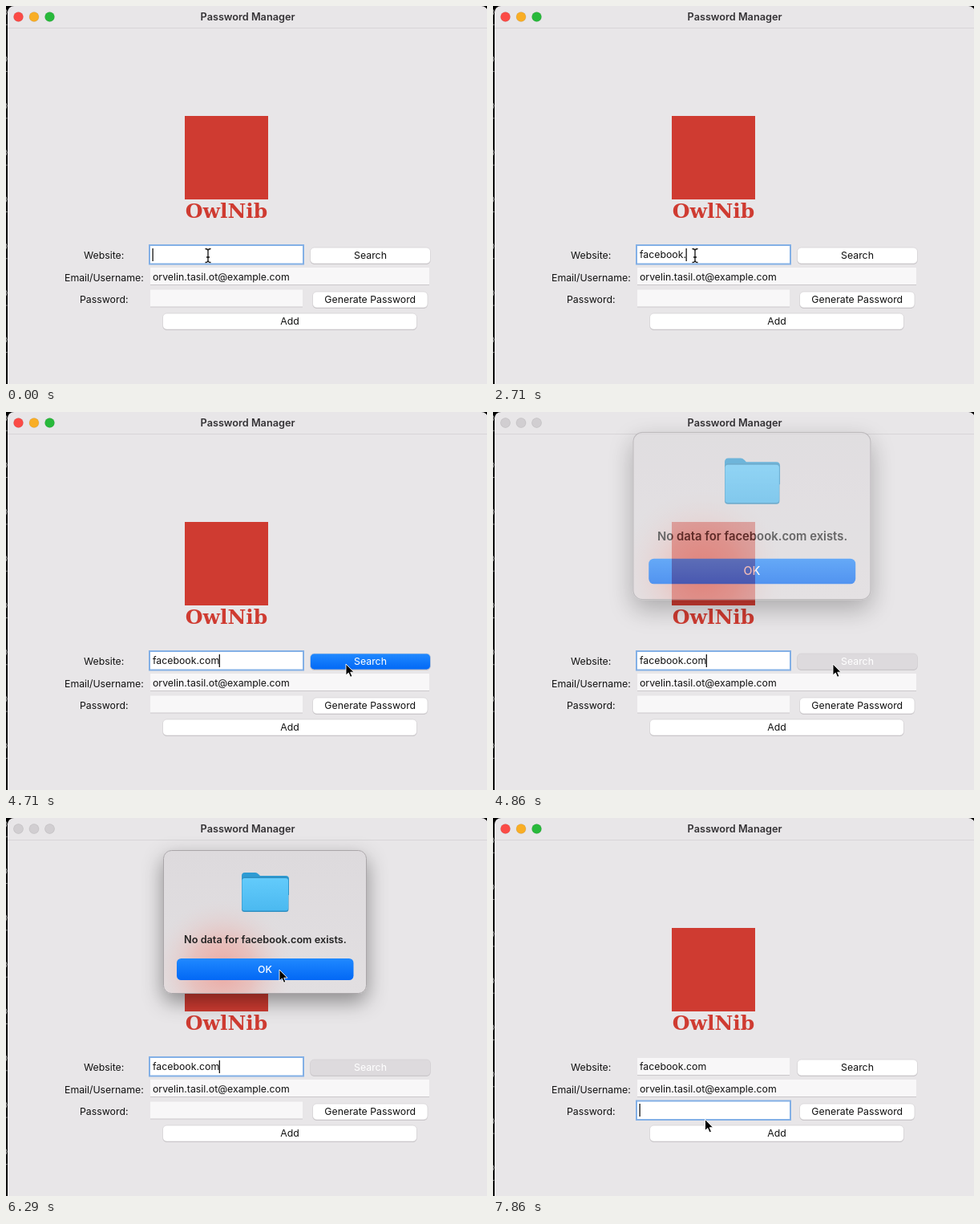
Animation of 600 by 471 pixels, one loop 8 s. Source, as an HTML page:

```html
<!DOCTYPE html>
<html lang="en">
<head>
<meta charset="utf-8">
<title>Password Manager</title>
<style>
  html, body { margin: 0; width: 100%; height: 100%; overflow: hidden; background: #000; }
  svg { display: block; width: 100%; height: 100%; }
  text { font: 12.3px Inter, "Open Sans", sans-serif; fill: #111; white-space: pre; }
  .bold { font-weight: 600; font-size: 12.7px; fill: #333134; }
  .mid { text-anchor: middle; }
  .brand { font: bold 25px "DejaVu Serif", "Noto Serif", serif; fill: #cf3b31; }
  .ring { fill: #fff; stroke: #83b0e6; stroke-width: 2; }
  .light { stroke: #0002; stroke-width: .6; }
</style>
</head>
<body>
<svg viewBox="0 0 600 471" preserveAspectRatio="none">
  <defs>
    <linearGradient id="blue" x2="0" y2="1">
      <stop stop-color="#2089ff"/><stop offset="1" stop-color="#0268f5"/>
    </linearGradient>
    <linearGradient id="folderFront" x2="0" y2="1">
      <stop stop-color="#63cbfb"/><stop offset="1" stop-color="#4bb9f0"/>
    </linearGradient>
    <linearGradient id="panel" x2="0" y2="1">
      <stop stop-color="#dddadd"/><stop offset="1" stop-color="#e2dfe1"/>
    </linearGradient>
    <radialGradient id="glow" gradientUnits="userSpaceOnUse" cx="270" cy="190" r="88">
      <stop stop-color="#ee9d95" stop-opacity=".85"/>
      <stop offset=".45" stop-color="#eab2ac" stop-opacity=".65"/>
      <stop offset="1" stop-color="#e2d4d5" stop-opacity="0"/>
    </radialGradient>
    <filter id="shadow" x="-30%" y="-30%" width="160%" height="180%">
      <feDropShadow dx="0" dy="10" stdDeviation="13" flood-opacity=".4"/>
    </filter>
  </defs>

  <g id="strip"></g>
  <rect x="2" y="0" width="599" height="490" rx="8" fill="#e8e6e8"/>
  <path d="M2 27.5H600" stroke="#d8d5d8"/>
  <g id="lights"></g>
  <text class="bold mid" x="301.500" y="17.500">Password Manager</text>

  <rect x="223" y="137" width="104" height="104" fill="#cf3b31"/>
  <text class="brand mid" x="275" y="264">OwlNib</text>

  <text x="97" y="315">Website:</text>
  <text x="73" y="342.500">Email/Username:</text>
  <text x="92" y="370">Password:</text>
  <g id="fields"></g>
  <text id="site" x="183" y="314"></text>
  <text x="183" y="341.500">orvelin.tasil.ot@example.com</text>
  <rect id="caret" width="1.200" height="16" fill="#000"/>
  <g id="buttons"></g>

  <g id="dialog">
    <g filter="url(#shadow)">
      <rect x="196.500" y="40.500" width="253" height="178" rx="10" fill="url(#panel)" stroke="#aaa6a9"/>
    </g>
    <rect x="197" y="41" width="252" height="177" rx="10" fill="url(#glow)"/>
    <path d="M294 72q0-4 4-4h13q2 0 4 2l2 2h32q4 0 4 4v20h-59z" fill="#2e9bd3"/>
    <rect x="294" y="73.500" width="58.500" height="43.500" rx="3.500" fill="#2f8fc1"/>
    <rect x="294.500" y="75" width="57.500" height="40.500" rx="3" fill="url(#folderFront)"/>
    <text class="bold mid" x="323.500" y="155.500" style="fill:#222">No data for facebook.com exists.</text>
    <rect id="ok" x="213" y="175" width="220.500" height="27" rx="5.500" fill="url(#blue)"/>
    <text class="mid" x="323" y="192.500" style="fill:#fff;font-weight:500">OK</text>
  </g>

  <path id="beam" d="M-3.500-8.500Q0-8.500 0-6V6Q0 8.500-3.500 8.500M3.500-8.500Q0-8.500 0-6V6Q0 8.500 3.500 8.500M-2 2H2"
        fill="none" stroke="#111" stroke-width="1.300"/>
  <path id="arrow" d="M0 0V14L3.300 11 5.600 16.300 7.900 15.300 5.700 10.200H10Z"
        fill="#000" stroke="#fff" stroke-width=".9"/>
</svg>
<script>
const LOOP = 8000, STEPS = 56, TICK = LOOP / STEPS;
const SITE = "facebook.com";
const KEY_STEPS = [5, 6, 8, 9, 11, 12, 14, 15, 17, 19, 20, 21];
// step, x, y
const POINTER = [
  [0, 252, 311], [23, 252, 311], [27, 424, 319], [31, 424, 319], [32, 424, 314],
  [35, 424, 314], [38, 368, 220], [43, 341, 189], [46, 341, 189],
  [51, 272, 364], [53, 268, 366], [55, 264.5, 375.5]
];
// step, scale, opacity
const DIALOG = [
  [32, 1.34, 0], [33, 1.29, .3], [34, 1.17, .65], [35, 1.07, .88], [36, 1.02, .97],
  [37, 1, 1], [45, 1, 1], [46, 1, .5], [47, 1, 0]
];

const $ = id => document.getElementById(id);
const set = (node, attrs) => {
  for (const name in attrs) node.setAttribute(name, attrs[name]);
  return node;
};
const add = (parent, tag, attrs) => parent.appendChild(
  set(document.createElementNS("http://www.w3.org/2000/svg", tag), attrs));
const show = (node, on) => set(node, { visibility: on ? "visible" : "hidden" });

function sample(table, step) {
  const i = table.findIndex(row => row[0] > step);
  if (i === 0) return table[0].slice(1);
  if (i < 0) return table[table.length - 1].slice(1);
  const a = table[i - 1], b = table[i], k = (step - a[0]) / (b[0] - a[0]);
  return a.slice(1).map((v, j) => v + (b[j + 1] - v) * k);
}

for (let y = -55; y < 471; y += 58.3) {
  add($("strip"), "path", { d: `M0 ${y + 1}q2 3 0 7M0 ${y + 20}h1.5`, stroke: "#aaa", fill: "none" });
}

const LIGHT_COLORS = ["#fb4b46", "#f9ae25", "#28b93b"];
const lights = [15.5, 35, 54.5].map(cx =>
  add($("lights"), "circle", { cx, cy: 13.5, r: 6, class: "light" }));

function field(y, width) {
  add($("fields"), "rect", { x: 180, y, width, height: 21.5, fill: "#f8f7f8" });
  add($("fields"), "path", { d: `M180 ${y + 21.5}h${width}`, stroke: "#cbc8cb" });
  return add($("fields"), "rect", { x: 179, y: y - 1, width: 192, height: 23.5, class: "ring" });
}
const siteRing = field(299, 190);
show(field(326, 348), false);
const passRing = field(353.5, 190);

function button(x, y, width, label) {
  add($("buttons"), "rect", { x, y: y + 1, width, height: 20, rx: 5, fill: "#c4c1c4" });
  const face = add($("buttons"), "rect",
    { x, y, width, height: 20, rx: 5, fill: "#fff", stroke: "#d3d0d3", "stroke-width": .7 });
  const text = add($("buttons"), "text", { x: x + width / 2, y: y + 14, class: "mid" });
  text.textContent = label;
  return { face, text };
}
const search = button(379.5, 301, 150, "Search");
button(382.5, 356, 143.5, "Generate Password");
button(195.5, 383, 317, "Add");

function draw(time) {
  const step = Math.floor((time % LOOP + 3) / TICK) % STEPS;
  const modal = step >= 33 && step < 47;
  const pressed = step === 32 || modal;
  const inPassword = step >= 53;

  lights.forEach((light, i) => set(light, { fill: modal ? "#d1ced1" : LIGHT_COLORS[i] }));
  set($("strip"), { transform: `translate(0 ${step >= 47 ? 20 : 0})` });

  const site = $("site");
  site.textContent = SITE.slice(0, KEY_STEPS.filter(s => s <= step).length);
  show(siteRing, !inPassword);
  show(passRing, inPassword);

  const typed = inPassword || !site.textContent ? 0 : site.getComputedTextLength();
  set($("caret"), { x: 182.5 + typed, y: inPassword ? 356 : 302 });
  show($("caret"), step >= 32 || (step * TICK + 618) % 903 >= 280);

  set(search.face, { fill: step === 32 ? "url(#blue)" : modal ? "#dddadd" : "#fff" });
  search.text.style.fill = pressed ? "#fff" : "";

  const [scale, opacity] = sample(DIALOG, step);
  set($("dialog"), {
    opacity,
    transform: `translate(323.300 129.700) scale(${scale}) translate(-323.300 -129.700)`
  });
  show($("dialog"), opacity > 0);
  set($("ok"), { fill: step >= 45 ? "#0a5fd6" : "url(#blue)" });

  const [x, y] = sample(POINTER, step);
  const overText = step < 26 || (step >= 51 && step < 55);
  for (const id of ["beam", "arrow"]) {
    set($(id), { transform: `translate(${x} ${y})` });
    show($(id), (id === "beam") === overText);
  }
}

const start = performance.now();
function frame() {
  draw(performance.now() - start);
  requestAnimationFrame(frame);
}
frame();
</script>
</body>
</html>
```
